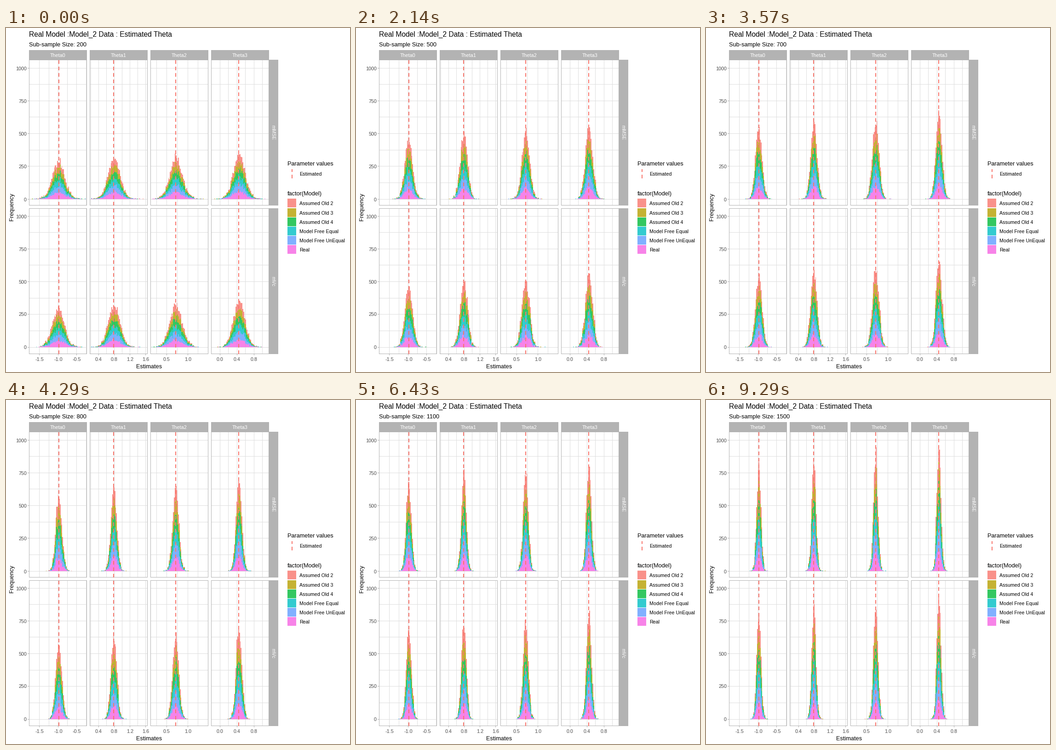
Recreate the animation shown at these times as a matplotlib script. Size 748x748 px, loop 10 s.

```python
import numpy as np
import matplotlib.pyplot as plt
from matplotlib.animation import FuncAnimation
from matplotlib.collections import LineCollection
from matplotlib.patches import Rectangle

SIZE, DPI = 748, 100
PX = 72 / DPI
GRID, GREY, INK = "#DEDEDE", "#B3B3B3", "#4D4D4D"
RED = "#F8766D"
MODELS = [("Assumed Old 2", RED), ("Assumed Old 3", "#B79F00"),
          ("Assumed Old 4", "#00BA38"), ("Model Free Equal", "#00BFC4"),
          ("Model Free UnEqual", "#619CFF"), ("Real", "#F564E3")]

# left, right, pixel of zero, pixels per unit, major breaks, minor breaks, true value, sd at n = 200
COLS = [
    (50, 176, 194.3, 80.9, (-1.5, -1.0, -0.5), (-1.25, -0.75, -0.25), -0.980, 0.165),
    (182, 308, 167.3, 84.9, (0.4, 0.8, 1.2, 1.6), (0.2, 0.6, 1.0, 1.4), 0.792, 0.150),
    (314, 440, 304.8, 90.2, (0.5, 1.0), (0.25, 0.75, 1.25), 0.713, 0.150),
    (446, 572, 465.3, 92.2, (0.0, 0.4, 0.8), (0.2, 0.6, 1.0), 0.448, 0.137),
]
# name, top, bottom, pixel of zero, degrees of freedom for the tails
ROWS = [("mMSE", 69, 386, 372, 14), ("mVc", 392, 709, 694, 40)]
Y_SCALE = 0.285
BIN = 0.02
RUNS = 1000
STEPS = 14
LOOP, TICK = 10000, 50

plt.rcParams["font.family"] = "Liberation Sans"
fig = plt.figure(figsize=(SIZE / DPI, SIZE / DPI), dpi=DPI, facecolor="white")
ax = fig.add_axes([0, 0, 1, 1])
ax.set_xlim(0, SIZE)
ax.set_ylim(SIZE, 0)
ax.axis("off")


def label(x, y, s, size, color="black", ha="left", va="baseline", rot=0):
    return ax.text(x, y, s, fontsize=size * PX, color=color, ha=ha, va=va,
                   rotation=rot, zorder=6)


def box(x0, y0, x1, y1, color, alpha=1):
    ax.add_patch(Rectangle((x0, y0), x1 - x0, y1 - y0, fc=color, alpha=alpha,
                           lw=0, antialiased=False))


def lines(segs, color, z):
    """One-pixel lines; coordinates are pixel indices, drawn at pixel centres."""
    segs = np.array(segs, float) + 0.5
    coll = LineCollection(segs, colors=color, linewidths=PX, zorder=z,
                          antialiaseds=False, capstyle="projecting")
    coll.set_snap(False)
    ax.add_collection(coll)


def dashed(x, y0, y1):
    ax.plot([x, x], [y0, y1], color=RED, lw=2 * PX, ls=(0, (4, 3)),
            dash_capstyle="butt", zorder=5)


def draw_panel(row, col):
    _, top, bottom, y0, _ = row
    left, right, x0, sx, major, minor, true, _ = col
    b, d = right - 1, bottom - 1
    ys = [int(y0 - v * Y_SCALE) for v in range(0, 1001, 125)]
    xs = [int(x0 + v * sx) for v in major + minor]
    lines([[(left, y), (b, y)] for y in ys] + [[(x, top), (x, d)] for x in xs],
          GRID, 1)
    lines([[(left, top), (b, top)], [(left, d), (b, d)],
           [(left, top), (left, d)], [(b, top), (b, d)]], GREY, 4)
    dashed(int(x0 + true * sx), bottom, top)


def make_bars(row, col):
    left, right, x0, sx = col[:4]
    lo = np.ceil((left - x0) / sx / BIN)
    hi = np.floor((right - x0) / sx / BIN)
    edges = (np.arange(lo, hi) + 0.5) * BIN
    pix = np.round(x0 + edges * sx)
    base = np.full(len(edges) - 1, float(row[3]))
    patches = [ax.stairs(base, pix, baseline=base, fill=True, color=c, alpha=0.8,
                         lw=0, antialiased=False, zorder=3) for _, c in MODELS]
    return row, col, edges, pix, patches


def stack_tops(step):
    """Pixel tops of every stacked layer, bottom layer first, for each panel."""
    n = 200 + 100 * step
    rng = np.random.default_rng(40 + step)
    panels = []
    for row, col, edges, _, _ in bars:
        df, true = row[4] * n / 200, col[6]
        sd = col[7] * np.sqrt(200 / n)
        draws = true * (1 + 2 / n) + sd * rng.standard_t(df, (len(MODELS), RUNS))
        counts = np.array([np.histogram(d, edges)[0] for d in draws])
        panels.append(row[3] - np.ceil(counts.cumsum(axis=0) * Y_SCALE))
    return panels


# Titles
label(50, 19, "Real Model :Model_2 Data : Estimated Theta", 15.65)
subtitle = label(50, 40, "", 12.8)
label(311, 740, "Estimates", 12.8, ha="center")
label(13, 389, "Frequency", 12.8, ha="center", va="center", rot=90)

# Panels, strips and axes
for i, col in enumerate(COLS):
    left, right, x0, sx, major = col[:5]
    box(left, 48, right, 69, GREY)
    label((left + right) / 2, 63, f"Theta{i}", 10.7, "white", "center")
    for v in major:
        x = int(x0 + v * sx)
        lines([[(x, 709), (x, 711)]], GREY, 4)
        label(x + 0.5, 724, f"{v:.1f}", 10.7, INK, "center")
    for row in ROWS:
        draw_panel(row, col)
for name, top, bottom, y0, _ in ROWS:
    box(572, top, 592, bottom, GREY)
    label(580, (top + bottom) / 2, name, 10.7, "white", "center", "center", 270)
    for v in range(0, 1001, 250):
        y = int(y0 - v * Y_SCALE)
        lines([[(47, y), (49, y)]], GREY, 4)
        label(45, y + 4.5, str(v), 10.7, INK, "right")

# Legends
label(612, 299, "Parameter values", 12.8)
dashed(622, 327, 307)
label(638, 321, "Estimated", 10.8)
label(612, 364, "factor(Model)", 12.8)
for i, (name, color) in enumerate(MODELS):
    y = round(371.4 + 20.1 * i)
    box(612, y, 631, y + 19, color, 0.8)
    label(638, y + 14, name, 10.65)

bars = [make_bars(row, col) for row in ROWS for col in COLS]
stacks = [stack_tops(step) for step in range(STEPS)]


def update(i):
    # A step shows from the tick in which its time falls
    step = int(((i + 1) * TICK - 1) * STEPS / LOOP)
    subtitle.set_text(f"Sub-sample Size: {200 + 100 * step}")
    for (row, _, _, pix, patches), tops in zip(bars, stacks[step]):
        floor = np.full(len(pix) - 1, float(row[3]))
        for patch, top in zip(reversed(patches), tops):
            patch.set_data(top, pix, floor)
            floor = top
    return [subtitle] + [p for b in bars for p in b[4]]


anim = FuncAnimation(fig, update, frames=LOOP // TICK, interval=TICK,
                     init_func=lambda: update(0), repeat=True, repeat_delay=0,
                     blit=False)
plt.show()
```
